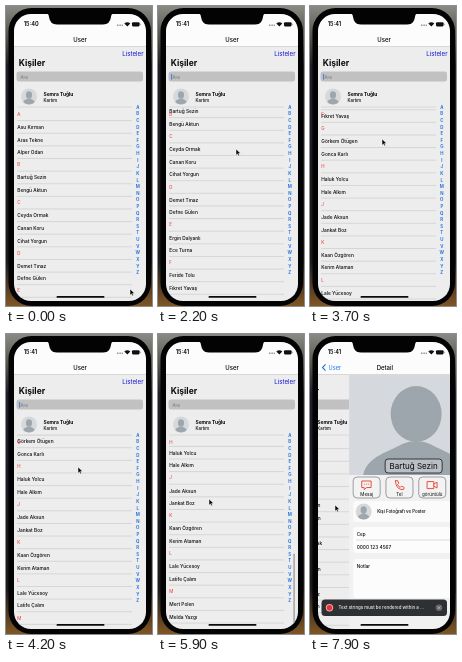
An HTML page for the animation above (8 s loop, 146x300 px).

```html
<!DOCTYPE html>
<html lang="tr">
<head>
<meta charset="utf-8">
<title>Kişiler</title>
<style>
  html, body { margin: 0; width: 100%; height: 100%; overflow: hidden; background: #0d0e10; }
  svg { display: block; width: 100vw; height: 100vh; }
  text { font-family: Inter, "Open Sans", sans-serif; dominant-baseline: central; fill: #080808; }
  .mid { text-anchor: middle; }
  .end { text-anchor: end; }
  .bold { font-weight: 700; }
  .semi { font-weight: 600; }
  .medium { font-weight: 500; }
  .blue { fill: #1673ee; }
  .link { fill: #1414dc; }
  .index { fill: #1268e0; }
  .red { fill: #ee3338; }
  .light { fill: #f4f4f4; }
  .rule { stroke: #c6c6c8; stroke-width: .6; }
  .icon { fill: none; stroke: #e8513f; stroke-width: 1; stroke-linejoin: round; stroke-linecap: round; }
</style>
</head>
<body>
<svg id="stage" viewBox="0 0 146 300"></svg>
<script>
const SCREEN = { x: 8, y: 8, w: 132, h: 287 };
const LIST_TOP = 102, ROW = 12.62, VIEW = 193;

const contacts = {
  A: ['Asu Kırman', 'Aras Tekne', 'Alper Odan'],
  B: ['Bartuğ Sezin', 'Bengü Aktun'],
  C: ['Ceyda Ormak', 'Canan Koru', 'Cihat Yorgun'],
  D: ['Demet Tınaz', 'Defne Gülen'],
  E: ['Ergin Dalyanlı', 'Ece Turna'],
  F: ['Feride Tolu', 'Fikret Yavaş'],
  G: ['Görkem Ötügen', 'Gonca Karlı'],
  H: ['Haluk Yolcu', 'Hale Alkım'],
  J: ['Jade Aksun', 'Jankat Boz'],
  K: ['Kaan Özgören', 'Kerim Ataman'],
  L: ['Lale Yücesoy', 'Latife Çalım'],
  M: ['Mert Polen', 'Melda Yazgı']
};

const text = (x, y, size, str, cls = '') =>
  `<text x="${x}" y="${y}" font-size="${size}" class="${cls}">${str}</text>`;
const box = (x, y, w, h, fill, r = 0, extra = '') =>
  `<rect x="${x}" y="${y}" width="${w}" height="${h}" rx="${r}" fill="${fill}" ${extra}/>`;
const rule = (x1, x2, y) => `<path class="rule" d="M${x1} ${y}H${x2}"/>`;

const avatar = (x, y) => `<g transform="translate(${x} ${y})">
  <circle r="8" fill="#d6d9dc"/><ellipse cy="-1.6" rx="3.1" ry="3.6" fill="#9fa7ae"/>
  <path d="M-5.6 5.7C-5 3 -2 3 -1.4 2H1.4C2 3 5 3 5.6 5.7A8 8 0 0 1 -5.6 5.7Z" fill="#9fa7ae"/></g>`;

function buildList() {
  let rows = '', heads = '', n = 0;
  const starts = [];
  for (const [letter, names] of Object.entries(contacts)) {
    starts.push(n * ROW);
    heads += `<g class="head">${text(11.3, ROW / 2, 4.5, letter, 'red')}</g>`;
    rows += rule(11, 126, ++n * ROW);
    for (const name of names) {
      rows += text(11.3, (n + .5) * ROW, 4.8, name, 'medium') + rule(11, 126, (n + 1) * ROW);
      n++;
    }
  }
  return { rows, heads, starts, height: n * ROW };
}
const list = buildList();

const letters = [...'ABCDEFGHIJKLMNOPQRSTUVWXYZ']
  .map((c, i) => text(131.8, 101.2 + i * 6.62, 4.4, c, 'index mid semi')).join('');

const listPage = `<g id="listPage">
  ${box(8, 40, 132, 256, '#ededed')}
  ${text(137.5, 47.5, 6.2, 'Listeler', 'link end')}
  ${text(12.8, 57.3, 8.5, 'Kişiler', 'bold')}
  ${box(10.5, 65.5, 126.5, 10, '#c1c1c2', 2.5)}
  <g opacity=".4">${text(14.5, 71, 4.4, 'Ara')}</g>
  ${box(13.2, 68, .9, 5.6, '#2f6cf0', .3, 'id="caret"')}
  ${avatar(23, 90.5)}
  ${text(37.5, 88, 4.9, 'Semra Tuğlu', 'bold')}
  ${text(37.5, 94, 4.3, 'Kartım', 'medium')}
  ${rule(11, 126, 101)}
  <g clip-path="url(#listClip)">
    <g id="rows">${list.rows}</g>${list.heads}
  </g>
  ${letters}
  ${box(135.5, 0, 1.2, 10, '#808082', .6, 'id="thumb"')}
</g>`;

const button = (i, label, icon) => {
  const x = 12 + i * 32.8;
  return box(x, 143, 27, 21, '#f3f3f3', 4, 'stroke="#77797c" stroke-width=".7"') +
    `<path class="icon" transform="translate(${x + 13.5} 151)" d="${icon}"/>` +
    text(x + 13.5, 160, 4.5, label, 'mid');
};
const bubble = 'M-4.5 -4H4.5V2.5H0L-2.5 4.6V2.5H-4.5ZM-2 -.8H-1.9M0 -.8H.1M2 -.8H2.1';
const handset = 'M-4 -4L-2 -4.6L-.6 -1.8L-2 -.4Q-1 1.6 .8 2.4L2.2 1L4.8 2.6L4 4.6Q-3.6 5 -4 -4Z';
const video = 'M-4.8 -3.4H1.6V3.6H-4.8ZM1.6 -1L4.8 -2.8V3L1.6 1.2';
const envelope = 'M-4.8 -3.5H4.8V3.5H-4.8ZL0 .6L4.8 -3.5';

const detailPage = `<g id="detailPage">
  ${box(8, 40, 132, 256, '#f1f1f2')}
  ${box(8, 41, 132, 100, '#d5d8dc')}
  <g fill="#9ea6ad"><ellipse cx="75" cy="80" rx="25.5" ry="28"/>
  <path d="M22 141C26 122 48 118 61 110Q75 104 89 110C102 118 124 122 128 141Z"/></g>
  ${box(44, 125, 57, 14, '#b9bfc5', 3, 'stroke="#16181a" stroke-width=".8"')}
  ${text(72.5, 132.3, 8, 'Bartuğ Sezin', 'mid')}
  ${button(0, 'Mesaj', bubble)}${button(1, 'Tel', handset)}
  ${button(2, 'görüntülü', video)}${button(3, 'Posta', envelope)}
  ${box(12, 167, 124, 21, '#fbfbfb', 3)}${avatar(22.5, 177.5)}
  ${text(36, 177.5, 4.4, 'Kişi Fotoğrafı ve Poster', 'medium')}
  ${box(12, 193, 132, 26, '#fcfcfc', 3)}
  ${text(15.5, 200.5, 4.6, 'Cep', 'medium')}${rule(15, 136, 206)}
  ${text(15.5, 212.5, 4.8, '0000 123 4567', 'medium')}
  ${box(12, 225, 132, 39, '#fcfcfc', 3)}
  ${text(15.5, 232.5, 4.6, 'Notlar', 'medium')}
</g>`;

const navBar = `${box(8, 7, 132, 33.5, '#fcfcfc')}${rule(8, 140, 40.5)}
  <g id="userTitle">${text(74, 33.5, 6, 'User', 'mid medium')}</g>
  <g id="back"><path d="M15 30.4L12 33.5L15 36.6" fill="none" stroke="#1673ee" stroke-width="1.1"/>
  ${text(18, 33.5, 5.6, 'User', 'blue')}</g>
  <g id="detailTitle">${text(74, 33.5, 6, 'Detail', 'mid medium')}</g>
  <text id="clock" x="17.7" y="18.3" font-size="5.6" class="semi"></text>
  ${[0, 1, 2, 3].map(i => box(111 + i * 1.6, 18.6, 1, 1.2, '#666', .3)).join('')}
  <path d="M118.300 17.4Q121.300 14.900 124.300 17.4L121.300 20.5Z" fill="#111"/>
  ${box(126, 16.2, 7.6, 4.2, '#111', 1.1)}${box(134, 17.6, .6, 1.4, '#777', .3)}`;

const toast = `<g id="toast">${box(11.5, 265.5, 125.5, 16.5, '#2f3032', 3.5)}
  <circle cx="19.5" cy="273.7" r="3.7" fill="#f2a5a7"/><circle cx="19.5" cy="273.7" r="2.7" fill="#e5323c"/>
  ${text(28.5, 273.8, 4.4, 'Text strings must be rendered within a …', 'light medium')}
  <circle cx="129" cy="273.7" r="3.3" fill="#66686b"/>
  <path d="M127.8 272.5L130.2 274.9M130.2 272.5L127.8 274.9" stroke="#ddd" stroke-width=".6"/></g>`;

const stage = document.getElementById('stage');
stage.innerHTML = `<defs>
  <linearGradient id="wall" x2="0" y2="1"><stop stop-color="#8b8b85"/><stop offset=".1" stop-color="#55544d"/>
    <stop offset=".2" stop-color="#1d2026"/><stop offset=".85" stop-color="#191a1d"/>
    <stop offset="1" stop-color="#805625"/></linearGradient>
  <clipPath id="screenClip">${box(SCREEN.x, SCREEN.y, SCREEN.w, SCREEN.h, '#fff', 17)}</clipPath>
  <clipPath id="listClip">${box(8, 101.2, 132, 195, '#fff')}</clipPath></defs>
  ${box(0, 0, 146, 300, 'url(#wall)')}
  ${box(2.5, 2, 142.5, 298, '#030304', 23)}
  <g clip-path="url(#screenClip)">
    ${listPage}${detailPage}${navBar}${toast}
    ${box(50.5, 290, 48, 1.8, '#0b0b0b', .9)}
  </g>
  <path d="M40 7H108Q105 8 105 11Q104 18.500 97 18.500H51Q44 18.500 43 11Q43 8 40 7Z" fill="#030304"/>
  <path id="cursor" d="M0 0V6.2L1.5 4.9L2.5 7L3.5 6.5L2.6 4.5L4.5 4.3Z" fill="#080808" stroke="#fff" stroke-width=".5"/>`;

const $ = id => document.getElementById(id);
const heads = [...document.querySelectorAll('.head')];
const move = (el, x, y) => el.setAttribute('transform', `translate(${x} ${y})`);

// Cubic interpolation that stays flat at peaks and holds.
function track(...keys) {
  const slope = i => {
    if (i < 1 || i >= keys.length - 1) return 0;
    const [[t0, a], [t1, b], [t2, c]] = keys.slice(i - 1, i + 2);
    const p = (b - a) / (t1 - t0), q = (c - b) / (t2 - t1);
    return p * q <= 0 ? 0 : 2 * p * q / (p + q);
  };
  return t => {
    const i = keys.findIndex(k => k[0] > t);
    if (i < 0) return keys[keys.length - 1][1];
    if (i === 0) return keys[0][1];
    const [t0, a] = keys[i - 1], [t1, b] = keys[i];
    const d = t1 - t0, u = (t - t0) / d, v = 1 - u;
    return a * (1 + 2 * u) * v * v + slope(i - 1) * d * u * v * v
      + b * u * u * (3 - 2 * u) - slope(i) * d * u * u * v;
  };
}

const scrollAt = track([1300, 0], [2200, 66], [2900, 165], [3700, 238], [4800, 287],
  [5300, 292.5], [5900, 292.5], [6500, 120], [7000, -3], [7100, -4], [7400, 0]);
const cursorX = track([100, 124], [300, 122], [500, 122], [1200, 78], [2300, 78], [3000, 72],
  [5000, 72], [5600, 51], [6000, 51], [7100, 52], [7500, 25]);
const cursorY = track([100, 283], [300, 279], [500, 279], [1200, 143], [2300, 143], [3000, 133],
  [5000, 133], [5600, 165], [6000, 165], [7000, 190], [7150, 190], [7500, 171]);

function drawList(t) {
  const scroll = scrollAt(t);
  move($('rows'), 0, LIST_TOP - scroll);
  heads.forEach((head, i) => {
    const next = (list.starts[i + 1] ?? Infinity) - scroll;
    move(head, 0, LIST_TOP + Math.min(Math.max(list.starts[i] - scroll, 0), next - ROW));
  });
  const thumb = $('thumb');
  thumb.setAttribute('y', 102 + Math.max(scroll, 0) / list.height * VIEW);
  thumb.setAttribute('height', VIEW * VIEW / list.height - 2);
  thumb.setAttribute('opacity', t >= 5850 && t < 7500 ? .85 : 0);
  $('caret').setAttribute('opacity', t % 1000 >= 150 && t % 1000 < 850 ? 1 : 0);
}

function drawPush(t) {
  const rest = 1 - Math.min(Math.max((t - 7710) / 500, 0), 1);
  const p = 1 - rest ** 3, left = 1 - p;
  move($('listPage'), -39.5 * p, 0);
  move($('detailPage'), SCREEN.w * left, 0);
  move($('userTitle'), -50 * p, 0);
  move($('detailTitle'), 65 * left ** 3, 0);
  move($('back'), 40 * left ** 3, 0);
  $('userTitle').setAttribute('opacity', Math.max(0, 1 - p * 1.5));
  for (const id of ['detailTitle', 'back']) $(id).setAttribute('opacity', Math.min(1, p * 1.3));
  $('toast').setAttribute('opacity', t >= 7800 ? 1 : 0);
}

function draw(now) {
  const t = now % 8000;
  drawList(t);
  drawPush(t);
  $('clock').textContent = t < 1000 ? '15:40' : '15:41';
  move($('cursor'), cursorX(t), cursorY(t));
}

const begin = performance.now();
function tick() {
  draw(performance.now() - begin);
  requestAnimationFrame(tick);
}
tick();
</script>
</body>
</html>
```
